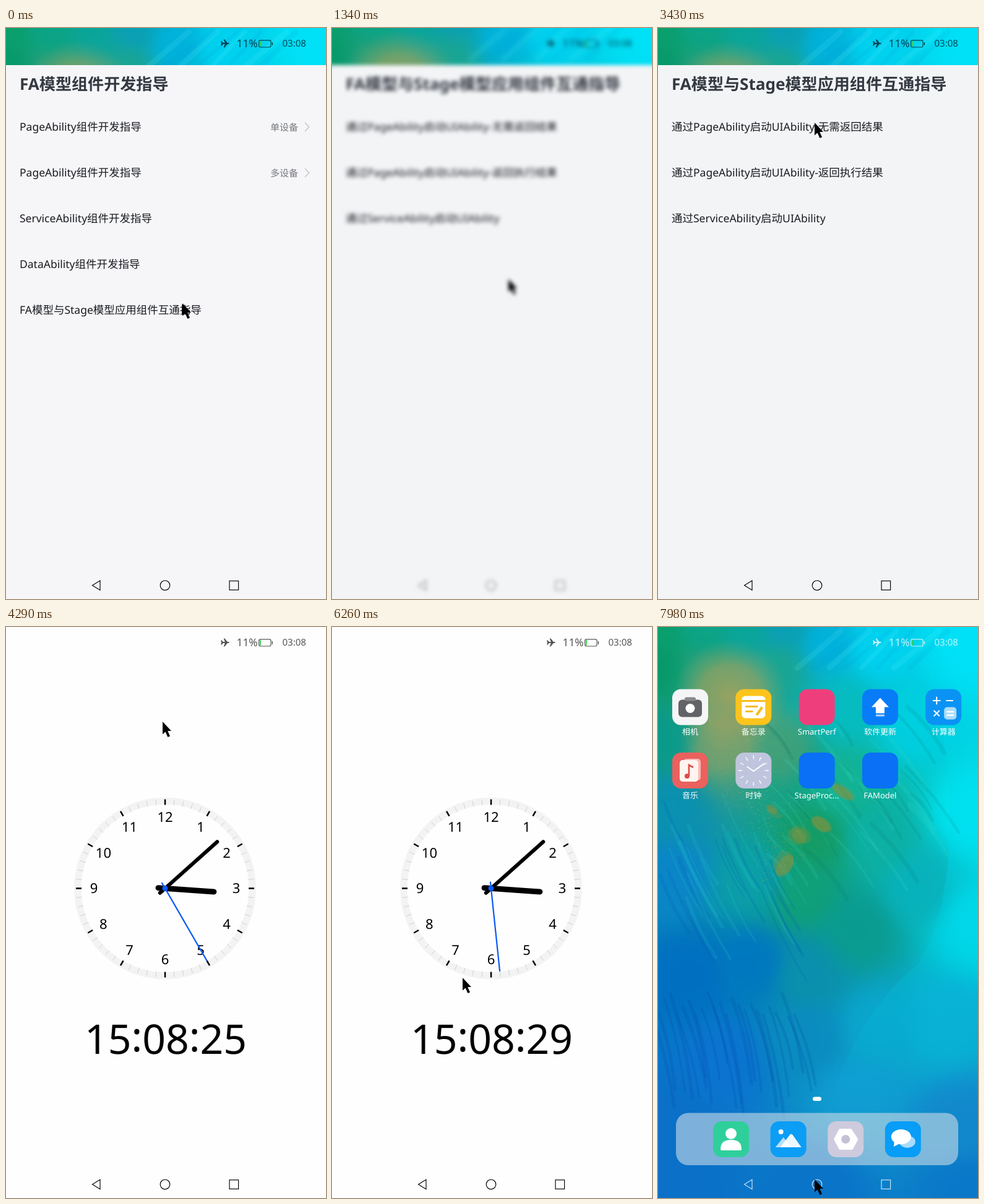
An HTML page with a canvas for the animation above (8000 ms loop, 517 by 923 pixels).

```html
<!DOCTYPE html>
<html lang="zh-CN">
<head>
<meta charset="utf-8">
<title>组件互通演示</title>
<style>
html, body { margin: 0; width: 517px; height: 923px; overflow: hidden; background: #f3f4f6; }
#stage, canvas, svg { position: absolute; left: 0; top: 0; width: 517px; height: 923px; }
svg { overflow: visible; }
text { font-family: "Noto Sans", "Noto Sans CJK SC", "Noto Sans CJK", sans-serif; text-rendering: geometricPrecision; }
.title { font-size: 26.1px; font-weight: 700; fill: #333841; }
.row { font-size: 17.5px; font-weight: 500; fill: #191b20; }
.side { font-size: 15px; fill: #74777d; }
.mid { text-anchor: middle; }
.label { font-size: 13px; font-weight: 500; fill: #fff; text-anchor: middle; }
</style>
</head>
<body>
<div id="stage">
  <canvas id="wall" width="517" height="923"></canvas>
  <svg viewBox="0 0 517 923">
    <g id="home"></g>
    <g id="list"></g>
    <g id="detail"></g>
    <g id="clock">
      <rect x="-30" y="-30" width="577" height="983" fill="#fefefe"/>
      <g id="face"></g>
    </g>
    <g id="status">
      <path d="M347 21.6h1.6l2.2 2.5h3L351.6 18.6h1.8l4.4 5.5h2q2 .9 0 1.8h-2l-4.4 5.5h-1.8l2.2-5.5h-3l-2.2 2.5H347l1.1-3.4z" fill="currentColor"/>
      <text x="372.5" y="31" font-size="17.3" fill="currentColor">11%</text>
      <rect x="408.6" y="19.8" width="19.4" height="11.2" rx="2.4" fill="none" stroke="currentColor" stroke-width="1.2"/>
      <rect x="429.6" y="23" width="1.5" height="5" rx=".7" fill="currentColor"/>
      <rect x="409.8" y="21.2" width="2" height="8.4" fill="#35d04f"/>
      <text x="446.5" y="30" font-size="15" fill="currentColor">03:08</text>
    </g>
    <g id="nav" fill="none" stroke="currentColor" stroke-width="1.15">
      <path d="M139.5 901 152 893.3v15.4z"/>
      <circle cx="257" cy="901" r="7.8"/>
      <rect x="361" y="893.8" width="14.6" height="14.6"/>
    </g>
    <path id="cursor" d="M0 0V20.5L4.6 16.4 8.4 25 12 23.4 8.2 15H14z" fill="#000"/>
  </svg>
</div>
<script>
const LOOP = 8000;
const $ = id => document.getElementById(id);
const CX = 257, CY = 422.5;

function polar(deg, r) {
  const a = deg * Math.PI / 180;
  return [CX + r * Math.sin(a), CY - r * Math.cos(a)].map(v => v.toFixed(2));
}

function line(deg, from, to, color, width, cap = 'butt') {
  return `<path d="M${polar(deg, from)}L${polar(deg, to)}" stroke="${color}" stroke-width="${width}" stroke-linecap="${cap}"/>`;
}

// ---- wallpaper ----
const tones = `0,0,0a9f6c 0,60,07996a 70,0,0aa486 140,0,0aa59a 70,70,2aa07a 190,60,1ba592 100,200,4f9f7c
200,0,0a9fb5 270,25,00b2dc 350,30,00d2f0 500,30,00e5fc 410,150,00cfe0 510,300,00e6f2 300,130,06bcc0 210,210,18a084
300,250,12b395 250,340,149c66 350,340,0cb0a4 230,430,0f9f78 320,490,0a9b90 150,410,0a9fa8 20,290,0a90b0 0,180,0a9a8a
20,400,0a86c8 420,420,08b2bc 510,480,00dcea 50,560,006fc0 150,540,0078c0 240,560,0a90ac 240,660,0a8cc0 100,700,0a74d0
20,800,0a70c8 350,640,0aa6cc 320,750,109cd2 460,640,0aaed4 490,800,1288cc 250,910,0a74c8 20,910,0a70c8 500,910,0a78c8`
  .split(/\s+/).map(s => {
    const [x, y, hex] = s.split(',');
    const n = parseInt(hex, 16);
    return { x: +x, y: +y, rgb: [n >> 16, n >> 8 & 255, n & 255] };
  });

function seeded(seed) {
  return () => (seed = (seed * 16807) % 2147483647) / 2147483647;
}

function paintWall() {
  const small = document.createElement('canvas');
  const w = small.width = 104, h = small.height = 185;
  const sc = small.getContext('2d');
  const img = sc.createImageData(w, h);
  for (let j = 0; j < h; j++) for (let i = 0; i < w; i++) {
    let sum = 0, mix = [0, 0, 0];
    for (const p of tones) {
      const k = 1 / ((p.x - i * 5) ** 2 + (p.y - j * 5) ** 2 + 700) ** 2;
      sum += k;
      mix = mix.map((v, c) => v + k * p.rgb[c]);
    }
    img.data.set([...mix.map(v => v / sum), 255], (j * w + i) * 4);
  }
  sc.putImageData(img, 0, 0);

  const c = $('wall').getContext('2d');
  const rnd = seeded(77);
  c.drawImage(small, 0, 0, 520, 925);

  // bright sheet to the right of the disc edge
  const sheet = c.createLinearGradient(0, 380, 0, 790);
  sheet.addColorStop(0, 'rgba(0,215,235,.35)');
  sheet.addColorStop(.6, 'rgba(0,190,215,.25)');
  sheet.addColorStop(1, 'rgba(0,190,215,0)');
  c.fillStyle = sheet;
  c.beginPath();
  c.moveTo(410, 0);
  c.bezierCurveTo(480, 150, 500, 420, 420, 545);
  c.bezierCurveTo(340, 610, 300, 700, 270, 790);
  c.lineTo(517, 790);
  c.lineTo(517, 0);
  c.fill();

  // warm glow, stretched towards the lower right
  function glow(x, y, r, alpha) {
    const g = c.createRadialGradient(x, y, 0, x, y, r);
    g.addColorStop(0, `rgba(172,162,92,${alpha})`);
    g.addColorStop(.55, `rgba(160,162,96,${alpha * .75})`);
    g.addColorStop(1, 'rgba(110,165,115,0)');
    c.fillStyle = g;
    c.fillRect(x - r, y - r, 2 * r, 2 * r);
  }
  glow(118, 112, 92, .85);
  glow(105, 190, 70, .45);
  glow(190, 190, 80, .3);

  function streak(x, y, dx, dy, bend, color, width) {
    c.strokeStyle = color;
    c.lineWidth = width;
    c.beginPath();
    c.moveTo(x, y);
    c.quadraticCurveTo(x + dx / 2 + bend, y + dy / 2 - bend, x + dx, y + dy);
    c.stroke();
  }
  c.lineCap = 'round';
  for (let i = 0; i < 40; i++) {
    const x = 170 + rnd() * 240, y = 120 + rnd() * 250, len = 40 + rnd() * 70;
    streak(x, y, len * .8, len, 6, i % 2 ? 'rgba(60,215,200,.14)' : 'rgba(0,110,100,.12)', 2 + rnd() * 5);
  }
  for (let i = 0; i < 30; i++) {
    const x = rnd() * 190, y = 270 + rnd() * 180, len = 70 + rnd() * 80;
    streak(x, y, len * .5, len, -5, i % 2 ? 'rgba(40,195,205,.17)' : 'rgba(0,85,180,.16)', 2 + rnd() * 4);
  }
  for (let i = 0; i < 24; i++) {
    const x = i * 10 - 10, y = 590 + rnd() * 40;
    streak(x, y, 26 + rnd() * 12, 80 + rnd() * 90, 7, 'rgba(0,75,165,.2)', 3 + rnd() * 3);
  }
  for (let i = 0; i < 8; i++)
    streak(225 + i * 26, 66, 50 + rnd() * 40, -60, -6, i % 2 ? 'rgba(0,140,205,.1)' : 'rgba(110,240,255,.12)', 5 + rnd() * 7);

  // gold patches and dust
  for (const [x, y, rx, ry] of [[228, 338, 19, 12], [264, 317, 19, 10], [203, 382, 17, 20], [185, 298, 14, 6], [298, 268, 22, 8]]) {
    c.fillStyle = 'rgba(142,145,60,.28)';
    for (let k = 0; k < 3; k++) {
      c.beginPath();
      c.ellipse(x + rnd() * 8 - 4, y + rnd() * 8 - 4, rx * (.6 + rnd() * .4), ry, .6, 0, 7);
      c.fill();
    }
  }
  for (let i = 0; i < 1000; i++) {
    const u = rnd(), spread = (rnd() + rnd() - 1) * 55;
    c.fillStyle = `rgba(190,175,95,${.15 + rnd() * .35})`;
    c.fillRect(70 + 140 * u + spread, 110 + 280 * u - spread * .6, 1.2, 1.2);
  }
}

// ---- pages ----
function page(title, rows, bg) {
  const body = rows.map(([name, side], i) => {
    const y = 165.5 + 74 * i;
    const more = side ? `<text class="side" x="427" y="${y}">${side}</text>
      <path d="M483 ${y - 12.5}l6.6 7-6.6 7" fill="none" stroke="#c3c5c9" stroke-width="1.4"/>` : '';
    return `<text class="row" x="22" y="${y}">${name}</text>${more}`;
  }).join('');
  return `<rect x="-30" y="60" width="577" height="893" fill="${bg}"/><text class="title" x="22" y="100">${title}</text>${body}`;
}

function dial() {
  let s = `<circle cx="${CX}" cy="${CY}" r="147" fill="#f3f3f3"/><circle cx="${CX}" cy="${CY}" r="135.5" fill="#fefefe"/>`;
  for (let i = 0; i < 60; i++)
    s += i % 5 ? line(i * 6, 135, 144, '#cfcfcf', 1) : line(i * 6, 135, 144, '#000', 2.5);
  for (let n = 1; n <= 12; n++) {
    const [x, y] = polar(n * 30, 115);
    s += `<text class="mid" x="${x}" y="${+y + 7.8}" font-size="22">${n}</text>`;
  }
  s += line(94, -11, 79, '#000', 9, 'round') + line(48.2, -11, 113, '#000', 6, 'round');
  return s + `<g id="second">${line(0, -11, 135, '#0a59f7', 2.2)}</g>
    <circle cx="${CX}" cy="${CY}" r="4.5" fill="#0a59f7"/><text id="digits" class="mid" x="258" y="689.5" font-size="66"></text>`;
}

// ---- home screen ----
const W = 'fill="#fff"';
const stroke = w => `fill="none" stroke="#fff" stroke-width="${w}" stroke-linecap="round"`;

function clockMarks() {
  let s = '';
  for (let i = 0; i < 12; i++) s += `<path d="M29 5v5" transform="rotate(${i * 30} 29 29)" ${stroke(1.4)}/>`;
  return s + `<path d="M19 23l10 7 17-12" ${stroke(2)}/>`;
}

const apps = [
  ['相机', '#f5f5f6', '<rect x="10" y="17" width="38" height="28" rx="6" fill="#626366"/><rect x="20" y="13" width="18" height="6" rx="3" fill="#88898c"/><circle cx="29" cy="31" r="7.5" fill="#fff"/>'],
  ['备忘录', '#fcc41c', `<rect x="10" y="11" width="38" height="36" rx="6" ${W}/><path d="M10 19h38M16 28h20M16 36h12" stroke="#f7bd18" stroke-width="3"/><path d="M34 42l9-13" stroke="#f7bd18" stroke-width="4"/>`],
  ['SmartPerf', '#ee3f7c', ''],
  ['软件更新', '#087cf8', `<path d="M29 14L43 29H36V39H22V29H15z" ${W}/><rect x="22" y="41" width="14" height="3" rx="1" fill="#b5d6fd"/>`],
  ['计算器', '#0a93f4', `<path d="M18 13v11M12.5 18.5h11M34 18.5h10M14 35l8 8M22 35l-8 8" ${stroke(2)}/><rect x="30" y="29" width="20" height="20" rx="5" fill="#a9dcf9"/><path d="M35 36.5h10M35 42h10" ${stroke(2.4)}/>`],
  ['音乐', '#ea615d', `<rect x="18" y="10" width="28" height="35" rx="5" fill="#f7b9b4"/><rect x="12" y="12" width="30" height="35" rx="5" fill="#fff4f0"/><path d="M27 38V20l7 4" fill="none" stroke="#dd4c4a" stroke-width="2.6"/><circle cx="24" cy="38" r="4" fill="#dd4c4a"/>`],
  ['时钟', '#bfc5dd', clockMarks()],
  ['StageProc...', '#0a70f5', ''],
  ['FAModel', '#0a70f5', '']
];

const dock = [
  ['#2fcf9b', `<circle cx="29" cy="20" r="9" ${W}/><path d="M12 45q0-15 17-15t17 15q0 2-3 2H15q-3 0-3-2z" ${W}/>`],
  ['#0c9df5', `<circle cx="17" cy="17" r="4" ${W}/><path d="M8 42l13-16 13 16z" fill="#b9e0fb"/><path d="M16 42l16-21q2-1 4 1l14 20z" fill="#fff" opacity=".92"/>`],
  ['#cdcbdd', `<path d="M20 14h17l10 15-8 15H20L12 29z" fill="#fff" stroke="#fff" stroke-width="4" stroke-linejoin="round"/><circle cx="29" cy="29" r="7" fill="#c3c1d4"/>`],
  ['#089df6', `<ellipse cx="36" cy="33" rx="13" ry="10" fill="#a9dcfb"/><ellipse cx="26" cy="25" rx="16" ry="12" ${W}/><path d="M15 32l-1 9 10-5z" ${W}/>`]
];

const tile = (x, y, color, art) =>
  `<g transform="translate(${x} ${y})"><rect width="58" height="58" rx="14" fill="${color}"/>${art}</g>`;

function homeScreen() {
  const grid = apps.map(([name, color, art], i) => {
    const x = 23 + 102.3 * (i % 5), y = i < 5 ? 100.5 : 203;
    return tile(x, y, color, art) + `<text class="label" x="${x + 29}" y="${y + 73.5}">${name}</text>`;
  }).join('');
  const bar = dock.map(([color, art], i) => tile(89 + 92.6 * i, 799, color, art)).join('');
  return `${grid}<rect x="250" y="759.5" width="14" height="6.5" rx="3.2" ${W}/>
    <rect x="29" y="785.5" width="456" height="84.5" rx="20" fill="#c3d8e6" fill-opacity=".62"/>${bar}`;
}

// ---- timeline: each step holds until the next ----
const scenes = [
  [0, 'list'], [500, 'detail', 'blur'], [630, 'detail'], [1340, 'detail', 'blur'], [1480, 'detail'],
  [3730, 'blank'], [4290, 'clock'], [7850, 'leave'], [7980, 'home']
];
const moves = [
  [0, 285, 445], [1340, 285, 406], [1880, 284, 384], [2010, 282, 357], [2150, 280, 336], [2270, 278, 313],
  [3150, 265, 231], [3300, 258, 188], [3430, 253, 153], [5290, 251, 158], [5440, 244, 182], [5570, 228, 220],
  [5860, 197, 349], [6100, 204, 431], [6260, 211, 567], [6570, 217, 664], [6710, 227, 772], [6860, 243, 838],
  [7420, 250, 883], [7570, 253, 893]
];
const ticks = [
  [0, 25], [5020, 26], [5440, 27], [5860, 28], [6260, 29], [6570, 30], [6710, 31], [6860, 32], [7570, 33]
];
const at = (steps, t) => steps.findLast(s => s[0] <= t);
const show = (id, on) => { $(id).style.display = on ? '' : 'none'; };

function draw(t) {
  const [, scene, effect] = at(scenes, t);
  const [, x, y] = at(moves, t);
  const sec = at(ticks, t)[1];
  const home = scene === 'home' || scene === 'leave';
  const plain = scene === 'blank' || scene === 'clock';

  show('list', scene === 'list');
  show('detail', scene === 'detail');
  show('clock', plain || scene === 'leave');
  show('face', scene !== 'blank');
  show('home', home);

  $('clock').setAttribute('transform', scene === 'leave' ? 'translate(258.5 461.5) scale(.8) translate(-258.5 -461.5)' : '');
  $('clock').setAttribute('opacity', scene === 'leave' ? .4 : 1);
  $('status').style.color = home ? 'rgba(255,255,255,.75)' : plain ? '#555' : 'rgba(0,25,40,.76)';
  $('nav').style.color = home ? 'rgba(255,255,255,.8)' : '#000';
  $('nav').setAttribute('opacity', effect ? .5 : 1);
  $('stage').style.filter = effect ? 'blur(3px)' : 'none';
  $('wall').style.transform = effect ? 'scale(1.04)' : 'none';

  $('second').setAttribute('transform', `rotate(${sec * 6} ${CX} ${CY})`);
  const colon = n => `<tspan dy="-4">:</tspan><tspan dy="4">${n}</tspan>`;
  $('digits').innerHTML = '15' + colon('08') + colon(sec);
  $('cursor').setAttribute('transform', `translate(${x} ${y})`);
}

paintWall();
$('list').innerHTML = page('FA模型组件开发指导', [
  ['PageAbility组件开发指导', '单设备'], ['PageAbility组件开发指导', '多设备'], ['ServiceAbility组件开发指导'],
  ['DataAbility组件开发指导'], ['FA模型与Stage模型应用组件互通指导']
], '#f6f6f8');
$('detail').innerHTML = page('FA模型与Stage模型应用组件互通指导', [
  ['通过PageAbility启动UIAbility-无需返回结果'], ['通过PageAbility启动UIAbility-返回执行结果'], ['通过ServiceAbility启动UIAbility']
], '#f3f4f6');
$('face').innerHTML = dial();
$('home').innerHTML = homeScreen();

const start = performance.now();
function frame() {
  draw((performance.now() - start) % LOOP);
  requestAnimationFrame(frame);
}
frame();
</script>
</body>
</html>
```
